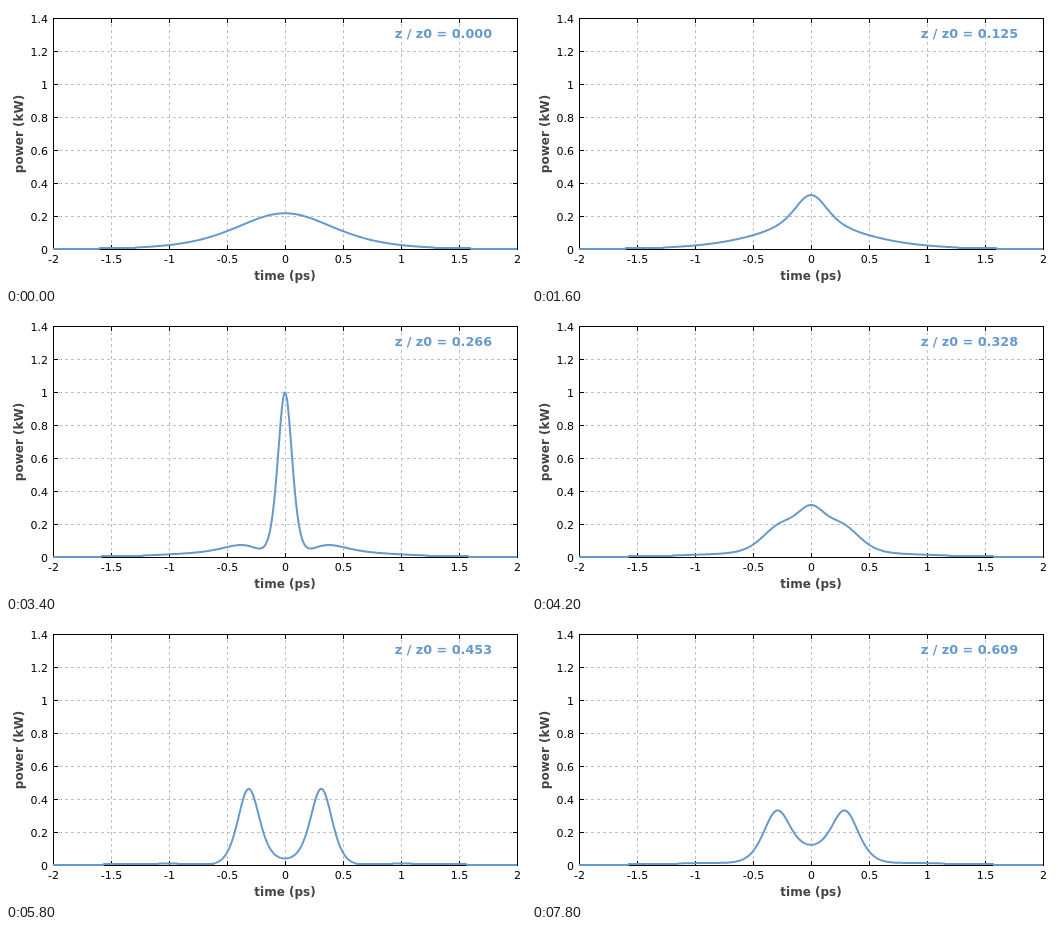
Recreate the animation shown at these times as an HTML page with a canvas. Size 520x280 px, loop 8 s.

```html
<!DOCTYPE html>
<html lang="en">
<head>
<meta charset="utf-8">
<title>Third-order soliton</title>
<style>
  html, body { margin: 0; width: 100%; height: 100%; overflow: hidden; background: #fff; }
  canvas { display: block; }
</style>
</head>
<body>
<canvas id="stage" width="520" height="280"></canvas>
<script>
const ctx = document.getElementById('stage').getContext('2d');
const { cos, sin, cosh, round, PI } = Math;

const LEFT = 47, RIGHT = 511, TOP = 12, BOTTOM = 243;
const STEP_MS = 200, STEPS = 40, STEPS_PER_PERIOD = 64;
const PEAK_POWER = 0.2165;   // kW at z = 0
const PULSE_WIDTH = 0.567;   // ps, sech half-width
const PERIOD_SCALE = 1.003;
const BLUE = '#6699cc';
const FONT = '"DejaVu Sans", Verdana, sans-serif';

const xOf = time => LEFT + (time + 2) * (RIGHT - LEFT) / 4;
const heightOf = power => power * (BOTTOM - TOP) / 1.4;

// Closed-form N = 3 soliton of the nonlinear Schrödinger equation
function power(time, z) {
  const t = time / PULSE_WIDTH;
  const a = 2 * PI * z * PERIOD_SCALE;
  const c = k => cosh(k * t);
  const p = 36 * c(4) + 16 * c(6);
  const q = 20 * c(4) + 80 * c(2);
  const re = 2 * c(8) + 32 * c(2) + p * cos(a) + q * cos(3 * a) + 50 * cos(2 * a) + 20 * cos(4 * a);
  const im = p * sin(a) + q * sin(3 * a) + 40 * sin(2 * a) + 20 * sin(4 * a);
  const den = c(9) + 9 * c(7) + 64 * c(3) + 36 * c(1)
    + 36 * c(5) * cos(a) + 20 * c(3) * cos(3 * a) + 90 * c(1) * cos(2 * a);
  return PEAK_POWER * (re * re + im * im) / (den * den);
}

// One-pixel lines that cover whole pixels, both ends included
function hLine(x1, x2, y) {
  ctx.beginPath();
  ctx.moveTo(x1, y + 0.5);
  ctx.lineTo(x2 + 1, y + 0.5);
  ctx.stroke();
}

function vLine(x, y1, y2) {
  ctx.beginPath();
  ctx.moveTo(x + 0.5, y1);
  ctx.lineTo(x + 0.5, y2 + 1);
  ctx.stroke();
}

function text(label, x, y, align, font, color) {
  ctx.font = `${font} ${FONT}`;
  ctx.textAlign = align;
  ctx.fillStyle = color;
  ctx.fillText(label, x, y);
}

function drawAxes() {
  const times = Array.from({ length: 9 }, (_, i) => -2 + i / 2);
  const powers = Array.from({ length: 8 }, (_, i) => i / 5);
  const rowOf = p => round(BOTTOM - heightOf(p));
  ctx.lineWidth = 1;

  ctx.strokeStyle = '#c0c0c0';
  ctx.setLineDash([3, 3]);
  for (const t of times.slice(1, -1)) vLine(round(xOf(t)), TOP, BOTTOM);
  for (const p of powers.slice(1, -1)) hLine(LEFT, RIGHT, rowOf(p));
  ctx.setLineDash([]);

  ctx.strokeStyle = '#000';
  for (const t of times) {
    const x = round(xOf(t));
    vLine(x, BOTTOM - 4, BOTTOM);
    vLine(x, TOP, TOP + 4);
    text(String(t), x + 0.5, 257, 'center', '11px', '#000');
  }
  for (const p of powers) {
    const y = rowOf(p);
    hLine(LEFT, LEFT + 4, y);
    hLine(RIGHT - 4, RIGHT, y);
    text(String(p), 42, y + 4.5, 'right', '11px', '#000');
  }
  ctx.strokeRect(LEFT + 0.5, TOP + 0.5, RIGHT - LEFT, BOTTOM - TOP);

  text('time (ps)', 279, 274, 'center', 'bold 12px', '#444');
  ctx.save();
  ctx.translate(17, 128);
  ctx.rotate(-PI / 2);
  text('power (kW)', 0, 0, 'center', 'bold 12px', '#444');
  ctx.restore();
}

function drawCurve(z) {
  ctx.beginPath();
  for (let x = LEFT; x <= RIGHT; x++) {
    const time = (x - LEFT) * 4 / (RIGHT - LEFT) - 2;
    const height = heightOf(power(time, z));
    // The flat tails sit on whole pixels
    ctx.lineTo(x, BOTTOM - (height < 1.5 ? round(height) : height));
  }
  ctx.strokeStyle = BLUE;
  ctx.lineWidth = 2;
  ctx.lineJoin = 'round';
  ctx.stroke();
}

let shown = -1;
function render(now) {
  const step = Math.floor(now / STEP_MS) % STEPS;
  if (step !== shown) {
    shown = step;
    const z = step / STEPS_PER_PERIOD;
    ctx.fillStyle = '#fff';
    ctx.fillRect(0, 0, 520, 280);
    drawAxes();
    text(`z / z0 = ${z.toFixed(3)}`, 486, 32, 'right', 'bold 12.75px', BLUE);
    drawCurve(z);
  }
  requestAnimationFrame(() => render(performance.now()));
}
render(performance.now());
</script>
</body>
</html>
```
